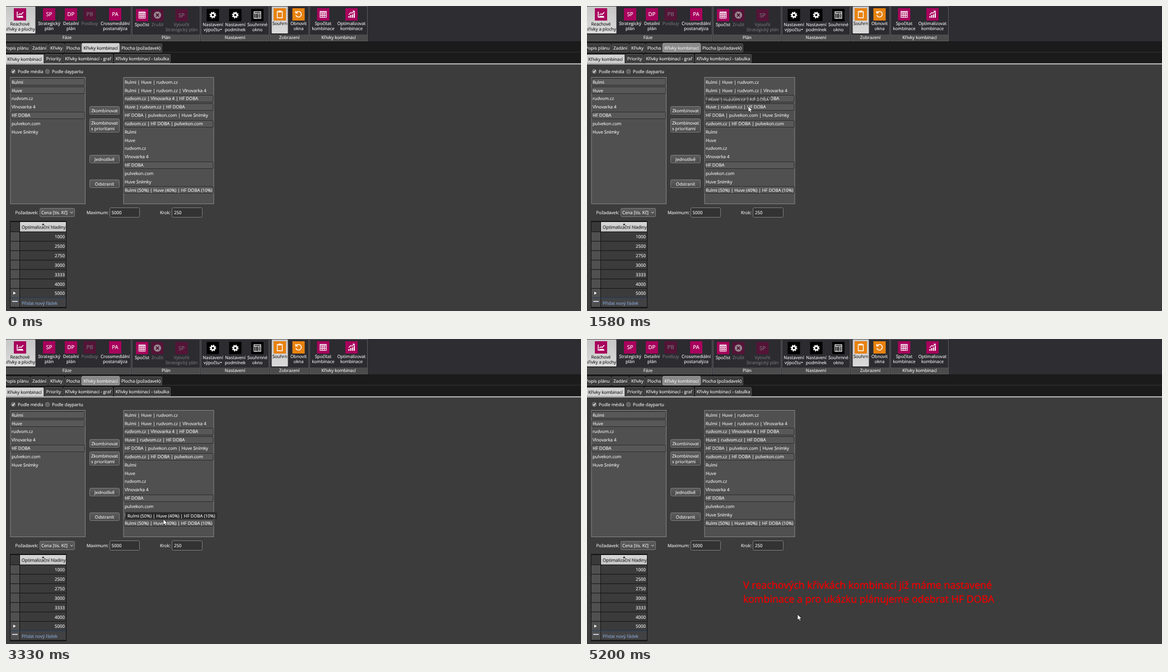
An HTML page for the animation above (8 s loop, 1027x545 px).

```html
<!DOCTYPE html>
<html lang="cs">
<head>
<meta charset="utf-8">
<title>Křivky kombinací</title>
<style>
html, body { margin: 0; width: 100%; height: 100%; overflow: hidden; background: #3c3c3c; }
svg { display: block; width: 1027px; height: 545px; }
text {
  font-family: "Open Sans", "Noto Sans", sans-serif; font-size: 7.85px; white-space: pre;
  color: #f2f2f2; fill: currentColor; stroke: currentColor; stroke-width: .018em;
  text-rendering: geometricPrecision;
}
</style>
</head>
<body>
<svg id="stage" viewBox="0 0 1027 545"></svg>
<script>
const stage = document.getElementById('stage');
const LOOP = 8000, MAGENTA = '#a8005c', ORANGE = '#e8820e';
const TEXT = '#f2f2f2', INK = '#1e1e1e', DIM = '#551437', DIM_TEXT = '#77747a';

function el(tag, attrs, parent = stage) {
  const node = document.createElementNS('http://www.w3.org/2000/svg', tag);
  for (const k in attrs) node.setAttribute(k, attrs[k]);
  return parent.appendChild(node);
}
const rect = (x, y, width, height, fill, extra) => el('rect', { x, y, width, height, fill, ...extra });
const box = (x, y, w, h, fill, stroke, rx = 0) => rect(x + .5, y + .5, w - 1, h - 1, fill, { stroke, rx });
const path = (d, extra) => el('path', { d, fill: 'none', stroke: '#fff', 'stroke-width': 1.2, ...extra });
// y is the vertical middle of the line
function label(s, x, y, extra = {}, parent = stage) {
  const t = el('text', { x, y: y + 2.8, ...extra }, parent);
  t.textContent = s;
  return t;
}
const mid = (s, x, y, color = TEXT) => label(s, x, y, { 'text-anchor': 'middle', style: `color:${color}` });

function gradient(id, from, to) {
  const g = el('linearGradient', { id, x2: 0, y2: 1 });
  el('stop', { offset: 0, 'stop-color': from }, g);
  el('stop', { offset: 1, 'stop-color': to }, g);
  return `url(#${id})`;
}
const LIGHT = gradient('light', '#c6c6c6', '#dadada');
const HEAD = gradient('head', '#d8d8d8', '#c4c4c4');
const BUTTON = gradient('button', '#5c5c5c', '#4c4c4c');

// Ribbon
rect(0, 0, 1027, 64, '#2d2d32');
rect(0, 63, 1027, 40, '#1b1b1c');
[[-4, 224, 'Fáze', 109], [225, 347, 'Plán', 286], [348, 470, 'Nastavení', 409],
 [471, 541, 'Zobrazení', 506], [542, 646, 'Křivky kombinací', 594]].forEach(([a, b, name, x]) => {
  box(a, 0, b - a, 63, '#2b2b30', '#5a5a5c');
  rect(a + 1, 51, b - a - 2, 11, '#4b4b4c');
  mid(name, x, 56.6);
});
rect(0, 1, 52.5, 48, LIGHT, { rx: 1 });
rect(474.5, 1, 29, 48, LIGHT, { rx: 1 });

const icons = {
  chart(x, y) {
    path(`M${x - 5} ${y - 5}v10h11M${x - 3} ${y + 1}l3 -2 2 1 4 -4M${x - 3} ${y + 3.4}h8`, { 'stroke-width': 1.5 });
  },
  grid(x, y) {
    path(`M${x - 5.5} ${y - 5.5}h11v11h-11zM${x - 5} ${y - 3.8}h10M${x - 5} ${y - 1}h10M${x - 5} ${y + 2.2}h10M${x - 1.8} ${y - 3}v8M${x + 1.8} ${y - 3}v8`);
  },
  cross(x, y) {
    el('circle', { cx: x, cy: y, r: 6.5, fill: '#98858f' });
    path(`M${x - 2.6} ${y - 2.6}l5.2 5.2m0 -5.2l-5.2 5.2`, { stroke: '#4e1435', 'stroke-width': 1.8 });
  },
  gear(x, y) {
    const ring = { cx: x, cy: y, fill: 'none', stroke: '#fff' };
    el('circle', { ...ring, r: 3.3, 'stroke-width': 2.6 });
    el('circle', { ...ring, r: 5.1, 'stroke-width': 1.8, 'stroke-dasharray': '2 2.005' });
  },
  panel(x, y) {
    path(`M${x - 6} ${y - 6}h12v12h-12zM${x - 6} ${y - 3.4}h12M${x - 2.6} ${y - 3}v9M${x} ${y - 1}h4.5M${x} ${y + 1.3}h4.5M${x} ${y + 3.6}h4.5`);
  },
  clip(x, y) {
    path(`M${x - 4.5} ${y - 5}h9v11h-9z`, { 'stroke-width': 1.4 });
    rect(x - 2.5, y - 6.7, 5, 3.2, '#fff');
  },
  redo(x, y) {
    path(`M${x - 4} ${y - 3.2}a5 5 0 1 1 -.8 4.4M${x - 5} ${y - 6}v3.6h3.6`, { 'stroke-width': 1.5 });
  },
  bars(x, y) {
    path(`M${x - 4.5} ${y + 6}v-3M${x - 1.3} ${y + 6}v-5M${x + 1.9} ${y + 6}v-6M${x + 5} ${y + 6}v-8.5`, { 'stroke-width': 2 });
    path(`M${x - 5} ${y + .5}l4 -4 2 1.5 4 -4M${x + 2} ${y - 6}h3.2v3.2`);
  }
};
// icon, centre x, first line y, lines, tile colour, text colour
[['chart', 25, 32, 'Reachové|křivky a plochy', MAGENTA, INK],
 ['SP', 77, 31.6, 'Strategický|plán', MAGENTA],
 ['DP', 116, 31.6, 'Detailní|plán', MAGENTA],
 ['PB', 149.5, 31.6, 'Postbuy', DIM, DIM_TEXT],
 ['PA', 195, 31.6, 'Crossmediální|postanalýza', MAGENTA],
 ['grid', 243, 33, 'Spočíst', MAGENTA],
 ['cross', 270.5, 33, 'Zrušit', DIM, DIM_TEXT],
 ['SP', 313.5, 33, 'Vytvořit|Strategický plán', DIM, DIM_TEXT],
 ['gear', 369.5, 33, 'Nastavení|výpočtu  ', '#000'],
 ['gear', 409.5, 33, 'Nastavení|podmínek', '#000'],
 ['panel', 449, 33, 'Souhrnné|okno', '#000'],
 ['clip', 489, 31.6, 'Souhrn', ORANGE, INK],
 ['redo', 522.5, 31.6, 'Obnovit|okna', ORANGE],
 ['grid', 566.5, 31.6, 'Spočítat|kombinace', MAGENTA],
 ['bars', 617, 31.6, 'Optimalizovat|kombinace', MAGENTA]].forEach(([icon, x, y, lines, tile, ink]) => {
  const cy = y > 32.5 ? 16.2 : 15;
  rect(x - 11, cy - 11, 22, 22, tile);
  if (icons[icon]) icons[icon](x, cy);
  else label(icon, x, cy + .5, { 'text-anchor': 'middle', style: `font-size:9.6px;color:${ink || '#fff'}` });
  lines.split('|').forEach((s, i) => mid(s, x, y + i * 8.9, ink));
});
path('M382 41h4l-2 2.2z', { fill: '#ddd', stroke: 'none' });

// Tabs
function tab(a, b, y, h, name, fill = '#3b3b3c', color = TEXT, stroke = '#59595a') {
  return { back: box(a, y, b - a, h, fill, stroke, 1), text: mid(name, (a + b) / 2, y + h / 2 + .2, color) };
}
rect(0, 82, 1027, 1, '#333334');
tab(-5, 43, 67, 16, 'Popis plánu');
tab(44, 75, 67, 16, 'Zadání');
tab(76, 104, 67, 16, 'Křivky');
tab(105, 135, 67, 16, 'Plocha');
tab(203, 279, 67, 16, 'Plocha (požadavek)');
const openTab = tab(135, 203, 66, 17, 'Křivky kombinací', '#8a8a8a', TEXT, '#969696');
tab(-2, 68, 86, 17, 'Křivky kombinací', '#d2d2d2', INK);
tab(69, 101, 86, 16, 'Priority');
tab(102, 191, 86, 16, 'Křivky kombinací - graf');
tab(193, 294, 86, 16, 'Křivky kombinací - tabulka');
rect(0, 102.5, 1027, 1.8, '#cfcfd2');

// Radio buttons
for (const cx of [13, 74]) el('circle', { cx, cy: 117, r: 3.8, fill: '#626262', stroke: '#858585', 'stroke-width': .8 });
path('M11 117l1.6 1.7 2.8 -4');
label('Podle média', 21, 117);
label('Podle daypartu', 82, 117);

// Lists
const rowY = i => 136 + i * 14.83;
function list(x, w, items, picked) {
  box(x, 127, w, 227, '#505050', '#858585');
  items.forEach((s, i) => {
    if (picked.includes(i)) box(x + 1, Math.round(rowY(i) - 6.6), w - 2, 13, '#585858', '#2d2d2d', 1);
    label(s, x + 2.4, rowY(i));
  });
}
const media = ['Rulmi', 'Huve', 'rudvom.cz', 'Vlnovarka 4', 'HF DOBA', 'pulvekon.com', 'Huve Snímky'];
const join = (...ids) => ids.map(i => media[i]).join(' | ');
const combos = [join(0, 1, 2), join(0, 1, 2, 3), join(2, 3, 4), join(1, 2, 4), join(4, 5, 6), join(2, 4, 5),
  ...media, `${media[0]} (50%) | ${media[1]} (40%) | ${media[4]} (10%)`];
list(7.5, 134.5, media, [0, 1, 4]);
list(209.5, 162, combos, [2, 3, 5, 10, 13]);

// Buttons and fields
const button = (y, h) => box(149, y, 54, h, BUTTON, '#7c7c7c', 2);
button(179, 15);
mid('Zkombinovat', 176, 187);
button(201, 25);
label('Zkombinovat', 152, 209);
label('s prioritami', 152, 219);
button(266, 15);
mid('Jednotlivě', 176, 274);
button(310, 15);
mid('Odstranit', 176, 318);

label('Požadavek:', 16.5, 369.5);
box(60, 361, 63, 16, BUTTON, '#7c7c7c', 2);
label('Cena [tis. Kč]', 63, 369.5);
path('M115 368l2.3 2.2 2.3 -2.2', { 'stroke-width': .9 });
label('Maximum:', 144, 369.5);
box(185, 360, 54, 18, '#333', '#7c7c7c', 2);
label('5000', 188.5, 369.5);
label('Krok:', 275, 369.5);
box(296, 360, 55, 18, '#333', '#7c7c7c', 2);
label('250', 300, 369.5);

// Levels table
rect(7, 384, 101, 156, '#141414');
rect(8, 386, 16, 17, '#39393a');
rect(25, 386, 82, 17, HEAD);
label('Optimalizační hladiny', 28, 395.3, { style: `color:${INK}` });
path('M64 391.6h4.6l-2.3 -3.4z', { fill: INK, stroke: 'none' });
[1000, 2500, 2750, 3000, 3333, 4000, 5000, 0].forEach((n, i) => {
  const y = 404 + i * 16.85;
  rect(8, y, 16, 15.8, '#505051');
  rect(25, y, 82, 15.8, n ? '#3b3b3c' : '#424244');
  if (n) label(n, 105, y + 8.5, { 'text-anchor': 'end' });
  else label('Přidat nový řádek', 28, y + 8.8, { style: 'color:#88a6cf' });
});
path('M13 510.5v5.2l4.6 -2.6z', { fill: '#fff', stroke: 'none' });
rect(8, 521, 99, 1, '#24405f');
rect(11, 527, 10, 1.6, '#dfe8fa');

// Moving parts
const tip = el('g', {});
const tipBox = el('rect', { x: 213.5, height: 12.5, fill: '#2a2a2b', stroke: '#3a3a3b' }, tip);
const tipText = label('', 217, 0, {}, tip);

const caption = el('g', {});
['V reachových křivkách kombinací již máme nastavené',
 `kombinace a pro ukázku plánujeme odebrat ${media[4]}`].forEach((s, i) =>
  label(s, 279, 443.5 + i * 25, { style: 'font-size:17.9px;color:#f00000' }, caption));

const cursor = el('path', {
  d: 'M0 0V10.2L2.4 8.1L4 11.8L5.8 11L4.2 7.4H7.4Z', fill: '#fff', stroke: '#111', 'stroke-width': .7
});

// time, cursor x, cursor y, tooltip row, tooltip opacity
const steps = [
  [160, 945, 534], [270, 815, 462], [380, 665, 380], [490, 520, 300],
  [600, 405, 235], [700, 335, 195], [810, 293, 171], [920, 279, 163],
  [1250, 279, 163, 2, .4], [1360, 279, 163, 2, 1], [1470, 284, 172], [1580, 288, 179, 3, .5], [1700, 288, 179, 3, 1],
  [1930, 300, 194], [2030, 307, 207], [2140, 307, 207, 5, .6], [2260, 307, 207, 5, 1],
  [2570, 304, 224], [2680, 298, 256], [2790, 288, 296], [2890, 282, 317], [3000, 281, 322],
  [3110, 281, 322, 13, .4], [3220, 281, 322, 13, .8], [3330, 281, 322, 13, 1],
  [3540, 271, 301], [3650, 261, 284], [3760, 261, 284, 10, .5], [3880, 261, 284, 10, 1],
  [4220, 320, 290], [4330, 372, 300], [4430, 395, 306], [4540, 405, 318],
  [4650, 409, 338], [4760, 409, 360], [4870, 405, 382], [4980, 400, 396],
  [5080, 387, 448], [5200, 376, 492]
];

function show(t) {
  const step = steps.findLast(s => s[0] <= t);
  const [, x = -50, y = -50, row = -1, alpha = 0] = step || [];
  cursor.setAttribute('transform', `translate(${x} ${y})`);
  cursor.setAttribute('visibility', step ? 'visible' : 'hidden');
  // the tab stays lit until the pointer comes in
  openTab.back.setAttribute('fill', step ? '#8a8a8a' : '#d2d2d2');
  openTab.text.style.color = step ? TEXT : INK;
  caption.setAttribute('visibility', t >= 5200 ? 'visible' : 'hidden');
  tip.setAttribute('opacity', alpha);
  if (row < 0) return;
  const top = Math.round(rowY(row) - 20) + .5;
  tipText.textContent = combos[row];
  tipText.setAttribute('y', top + 9.2);
  tipBox.setAttribute('y', top);
  tipBox.setAttribute('width', tipText.getComputedTextLength() + 7);
}

const start = performance.now();
function tick() {
  show((performance.now() - start) % LOOP);
  requestAnimationFrame(tick);
}
tick();
</script>
</body>
</html>
```
